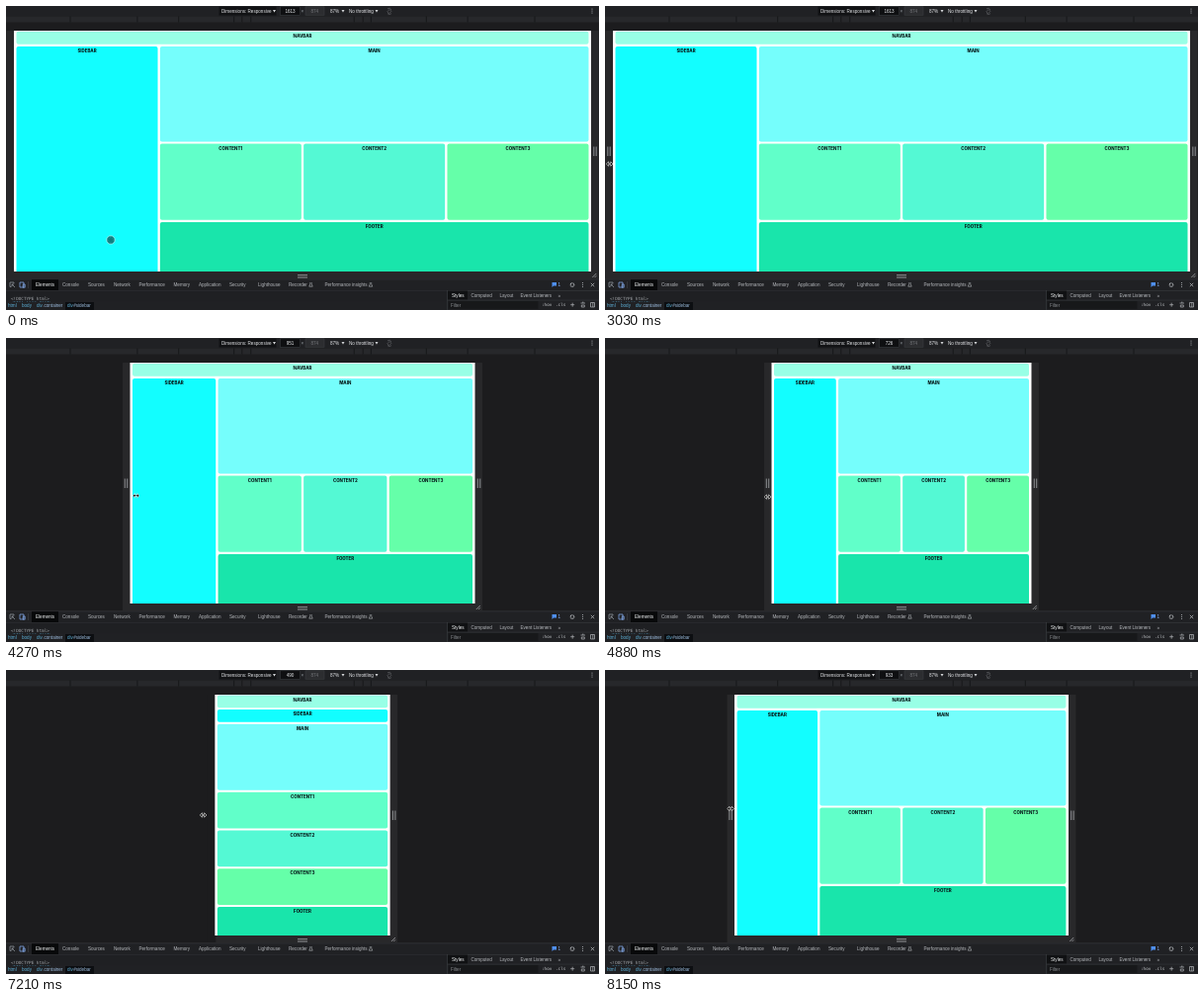
These frames come from a looping animation (600x308 px, 8.91 s). An HTML page:

```html
<!DOCTYPE html>
<html lang="en">
<head>
<meta charset="utf-8">
<title>Responsive grid</title>
<style>
html, body { margin: 0; width: 100%; height: 100%; overflow: hidden; background: #1c1c1e; }
svg { display: block; width: 600px; height: 308px; }
text { font-family: "Liberation Sans", Arial, sans-serif; font-size: 4.6px; fill: #c4c7cb; white-space: pre; }
.label { font: 800 4.4px Inter, sans-serif; fill: #071c1c; text-anchor: middle; }
.mono { font-family: "DejaVu Sans Mono", monospace; font-size: 4.3px; }
</style>
</head>
<body>
<svg id="stage" viewBox="0 0 600 308"></svg>
<script>
const LOOP = 8910;
const SCALE = 0.3621;
const BREAKPOINT = 600;
const stage = document.getElementById("stage");

function add(tag, attrs, parent = stage) {
  const node = document.createElementNS("http://www.w3.org/2000/svg", tag);
  set(node, attrs);
  parent.append(node);
  return node;
}
function set(node, attrs) {
  for (const key in attrs) node.setAttribute(key, attrs[key]);
}
const rect = (x, y, width, height, fill, parent, more = {}) =>
  add("rect", { x, y, width, height, fill, ...more }, parent);
const path = (d, stroke, parent, more = {}) =>
  add("path", { d, stroke, fill: "none", "stroke-width": 0.7, ...more }, parent);
function text(x, y, string, fill = "#c4c7cb", cls = "", parent = stage) {
  const node = add("text", { x, y, class: cls, style: cls === "label" ? "" : `fill:${fill}` }, parent);
  node.textContent = string;
  return node;
}
const arrowDown = x => add("path", { d: `M${x} 4h3l-1.5 2.6z`, fill: "#d5d7da" });
const dots = (x, y) => [-2, 0, 2].forEach(d => add("circle", { cx: x, cy: y + d, r: 0.6, fill: "#aeb1b5" }));
const grip = parent => path("M-1.2 -4.8V4.8M1.2 -4.8V4.8", "#85878a", parent, { "stroke-width": 1.1 });

// Device toolbar and breakpoint ruler
rect(0, 0, 600, 10, "#202124");
rect(215.5, 0.5, 58, 9, "#111214");
text(218, 6.7, "Dimensions: Responsive", "#e3e5e8");
arrowDown(270);
rect(277.5, 0.8, 20, 8.4, "#0e0f11", stage, { stroke: "#3c4043", "stroke-width": 0.5 });
const widthLabel = text(287.5, 6.7, "", "#e8eaed");
widthLabel.setAttribute("text-anchor", "middle");
text(298.6, 6.6, "×", "#9aa0a6");
rect(303, 0.8, 19, 8.4, "#2c2d30", stage, { stroke: "#3c4043", "stroke-width": 0.5 });
text(308.5, 6.7, "874", "#77797d");
text(328, 6.7, "87%", "#e3e5e8");
arrowDown(339.5);
text(347, 6.7, "No throttling", "#e3e5e8");
arrowDown(373.5);
path("M385.8 5.8l2.3-2.3 1.8 1.8-2.3 2.3zM386 2.8a2.8 2.8 0 0 1 4 1M390 7.6a2.8 2.8 0 0 1-4 0", "#77797d", stage, { "stroke-width": 0.5 });
dots(593, 5);
rect(0, 10.5, 600, 6, "#27282b");
for (const size of [320, 375, 425, 768, 1024, 1440]) {
  const half = size * 0.1632;
  for (const x of [300 - half, 300 + half]) rect(x - 0.5, 10.5, 1, 6, "#17181a");
}

// Emulated page
const strips = rect(0, 25, 0, 251, "#28282a");
const leftStripCover = rect(0, 25, 9, 251, "#1c1c1e");
const clip = add("clipPath", { id: "page" });
const clipRect = rect(0, 25, 600, 244, "#fff", clip);
const page = add("g", { "clip-path": "url(#page)" });
rect(0, 25, 600, 244, "#fff", page);

// wide: column, span, top, height; tall: top, height
const cells = [
  ["NAVBAR", "#98ffe6", [0, 4, 25.8, 13], [25.5, 12.7]],
  ["SIDEBAR", "#12feff", [0, 1, 41, 260], [40.1, 12.6]],
  ["MAIN", "#75fefc", [1, 3, 41, 96.5], [54.8, 67]],
  ["CONTENT1", "#61ffc9", [1, 1, 139.4, 77.3], [123.8, 36.7]],
  ["CONTENT2", "#54f9d4", [2, 1, 139.4, 77.3], [162.5, 36.7]],
  ["CONTENT3", "#65ffa9", [3, 1, 139.4, 77.3], [201.2, 36.7]],
  ["FOOTER", "#19e5ab", [1, 3, 219, 80], [239.9, 60]],
].map(([name, color, wide, tall]) => ({
  wide, tall,
  box: rect(0, 0, 0, 0, color, page, { rx: 2 }),
  label: text(0, 0, name, "", "label", page),
}));

const leftGrip = grip();
const rightGrip = grip();
path("M295 272.7h10M295 275h10", "#929497", stage, { "stroke-width": 1 });
const corner = path("M-2 2L2 -2M0.3 2L2 0.3", "#a2a4a7", stage, { "stroke-width": 0.8 });

// Tool panel
rect(0, 276.8, 600, 31.2, "#202124");
rect(0, 276.6, 600, 0.6, "#3a3c40");
rect(26, 277.2, 27, 10.8, "#08090a");
rect(0, 288, 600, 0.6, "#3a3c40");
path("M8 281.2V280H4v4.5h1.5M6 282l3 3M6 284v-2h2", "#9aa0a6");
path("M14 280h4v5h-4zM17.2 282h2v3.2h-2z", "#8ab4f8");
rect(22.5, 279, 0.5, 7, "#4a4c50");
[[30, "Elements"], [57, "Console"], [83, "Sources"], [109, "Network"], [134.5, "Performance"],
 [169.5, "Memory"], [195, "Application"], [226, "Security"], [255, "Lighthouse"],
 [286, "Recorder"], [322.5, "Performance insights"]]
  .forEach(([x, name], i) => text(x, 284.2, name, i ? "#b4b7bb" : "#f1f3f4"));
for (const x of [308.5, 369]) path(`M${x - 0.7} 280v1.7l-1 2.5h3.4l-1-2.5v-1.7`, "#b4b7bb", stage, { "stroke-width": 0.6 });
add("path", { d: "M552.5 280h4.5v3.5h-3l-1.5 1.4z", fill: "#4f8ff0" });
text(558.5, 284.2, "1", "#8ab4f8");
add("circle", { cx: 573, cy: 282.5, r: 1.8, fill: "none", stroke: "#aeb1b5", "stroke-width": 1.1, "stroke-dasharray": "1 .4" });
dots(583.5, 282.5);
path("M591.8 280.8l3.4 3.4m0-3.4l-3.4 3.4", "#c4c7cb");

rect(0, 288.6, 446, 10.4, "#1f2023");
text(5, 293.8 + 4.5, "<!DOCTYPE html>", "#a4a7ab", "mono");
const secondLine = add("svg", { x: 0, y: 299, width: 446, height: 2 });
text(5, 3, "<html lang=\"en\">", "#5db0d7", "mono", secondLine);
rect(0, 299.8, 446, 8.2, "#202124");
rect(60, 300, 29, 8, "#0c0e11");
[[2, "html"], [16, "body"], [31, "div"], [62, "div"]]
  .forEach(([x, name]) => text(x, 305, name, "#5db0d7"));
text(37.2, 305, ".container", "#9bbbdc");
text(68.2, 305, "#sidebar", "#9bbbdc");

rect(446, 288, 0.6, 20, "#3a3c40");
rect(447, 288.6, 20, 9, "#101113");
[[451, "Styles"], [470.5, "Computed"], [499.5, "Layout"], [520.5, "Event Listeners"], [558.5, "»"]]
  .forEach(([x, name], i) => text(x, 294.5, name, i ? "#b4b7bb" : "#f1f3f4"));
rect(446, 297.8, 154, 0.5, "#3a3c40");
rect(447.5, 299, 91, 7.8, "#17181a");
text(450, 304.5, "Filter", "#85888c");
text(542, 304.3, ":hov", "#c4c7cb", "mono");
text(556, 304.3, ".cls", "#c4c7cb", "mono");
path("M571.2 302.7h4M573.2 300.7v4", "#b4b7bb");
path("M581.5 301h4.5M582.3 303h3v2h-3zM583.8 301v-1.5", "#b4b7bb");
path("M591.5 300.5h4v4.5h-4zM593.8 300.5v4.5", "#b4b7bb");

// Pointers
const touch = add("g", {});
add("circle", { r: 4.2, fill: "#0b7c7e", stroke: "#b9ffff", "stroke-width": 0.7 }, touch);
add("circle", { r: 2.3, fill: "none", stroke: "#2fa5a5", "stroke-width": 0.6, "stroke-dasharray": "1 .8" }, touch);
const resize = add("path", {
  d: "M-3.4 0L-1.1 -2.2V-.6H1.1V-2.2L3.4 0 1.1 2.2V.6H-1.1V2.2z",
  fill: "#0a0a0a", stroke: "#fff", "stroke-width": 0.6,
});

const mix = (a, b, k) => a + (b - a) * k;
const progress = (t, from, to) => Math.min(1, Math.max(0, (t - from) / (to - from)));
const ease = k => k * k * (3 - 2 * k);

const drags = [
  [3030, 4880, 8, 168.56],
  [5030, 6500, 168.56, 247.3],
  [6660, 8150, 247.3, 131.08],
];
function pageLeft(t) {
  const drag = drags.findLast(d => t >= d[0]) || drags[0];
  return mix(drag[2], drag[3], ease(progress(t, drag[0], drag[1])));
}

const heights = [[3030, 160], [3730, 158.5], [4880, 161], [6180, 157], [7210, 147], [8150, 140.5]];
function pointerY(t) {
  let y = heights[0][1];
  for (let i = 1; i < heights.length; i++) {
    const [from] = heights[i - 1], [to, end] = heights[i];
    y = mix(y, end, progress(t, from, to));
  }
  return y;
}
const move = (node, x, y) => node.setAttribute("transform", `translate(${x} ${y})`);
const show = (node, visible) => node.setAttribute("visibility", visible ? "visible" : "hidden");

function layout(left, stacked) {
  const inset = left + 2.5, total = 595 - 2 * left, gap = 2.3;
  const column = (total - 3 * gap) / 4;
  for (const { wide, tall, box, label } of cells) {
    const [col, span, top, tallness] = wide;
    const x = stacked ? inset : inset + col * (column + gap);
    const width = stacked ? total : span * column + (span - 1) * gap;
    const y = stacked ? tall[0] : top;
    const height = stacked ? tall[1] : tallness;
    set(box, { x, y, width, height });
    set(label, { x: x + width / 2, y: y + 6.1 });
  }
}

function draw(t) {
  const left = pageLeft(t < 5000 ? t - 20 : t);
  const right = 600 - left;
  const pixels = Math.round((600 - 2 * pageLeft(t)) / SCALE);
  const stacked = pixels < BREAKPOINT;
  widthLabel.textContent = pixels;

  set(strips, { x: left - 7.5, width: right - left + 15 });
  set(leftStripCover, { x: left - 8 });
  show(leftStripCover, stacked);
  set(clipRect, { x: left, width: right - left });
  layout(left, stacked);
  move(leftGrip, left - 4, 147.3);
  show(leftGrip, !stacked && t > 2480);
  move(rightGrip, right + 4, 147.3);
  move(corner, right + 3.3, 273);

  const approach = ease(progress(t, 900, 2480));
  const touching = approach < 0.98;
  show(touch, touching);
  show(resize, !touching);
  move(touch, mix(106, 4, approach), mix(237, 160, approach));
  move(resize, pageLeft(t + (t < 2950 ? 0 : 70)) - 4, pointerY(t));
}

const start = performance.now();
function tick() {
  draw((performance.now() - start) % LOOP);
  requestAnimationFrame(tick);
}
tick();
</script>
</body>
</html>
```
